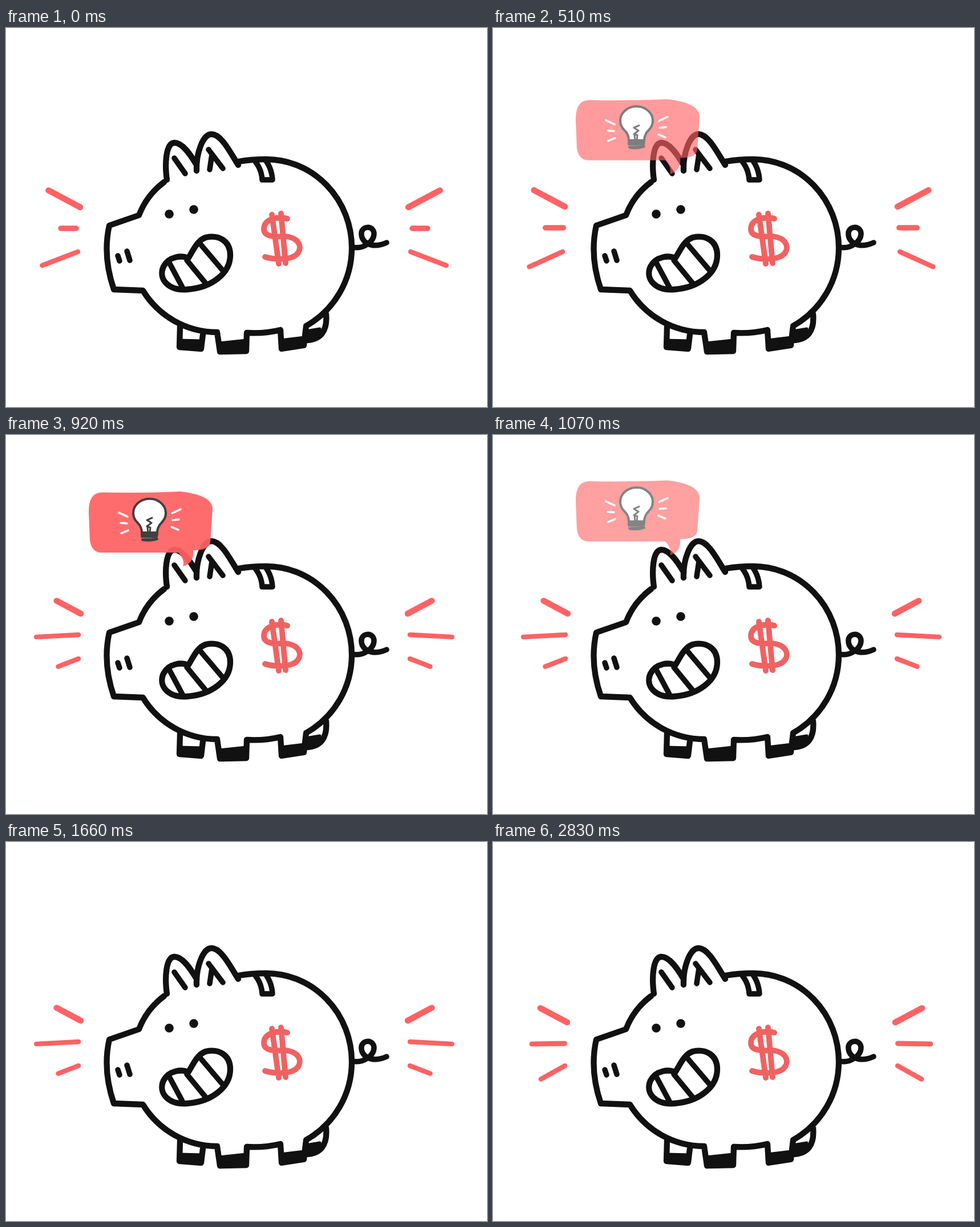
An HTML page for the animation above (2900 ms loop, 843 by 664 pixels).

```html
<!DOCTYPE html>
<html lang="en">
<head>
<meta charset="utf-8">
<title>Piggy bank idea</title>
<style>
  html, body { margin: 0; width: 100%; height: 100%; overflow: hidden; background: #fff; }
  svg { display: block; width: 100%; height: 100%; }
  path { fill: none; stroke-linecap: round; stroke-linejoin: round; }
  #pig { stroke: #111; stroke-width: 10.3; }
  #pig .thin { stroke-width: 9.5; }
  #pig .solid { fill: #111; stroke-width: 5; }
  #dollar { stroke: #f06262; stroke-width: 9.8; }
  #rays { stroke: #ff6264; filter: blur(.7px); }
  #bubble .box { fill: #ff6264; }
  #bubble .ink { stroke: #333; stroke-width: 4; }
  #bubble .glass { fill: #fff; }
  #bubble .cap { fill: #333; }
  #bubble .glow { stroke: #fff; stroke-width: 3.5; }
</style>
</head>
<body>
<svg viewBox="0 0 843 664">
  <g id="pig">
    <!-- ears -->
    <path d="M282 266C278 238 280 202 295 201C310 201 324 223 334 240"/>
    <path d="M334 250C333 220 345 186 360 186C377 186 392 216 407 240"/>
    <path class="thin" d="M295 228L314 255M355 213L380 246M361 221L357 248"/>
    <!-- back, legs, belly and snout -->
    <path d="M407 234Q430 230 456 230A150 155 0 0 1 606 385A157 157 0 0 1 526 522L522 556L483 562L481 529Q452 536 422 534L421 566L375 567L370 533A152 152 0 0 1 240 460L189 458Q169 400 181 346L233 328A130 130 0 0 1 277 270"/>
    <path d="M305 523L304 559L342 562L345 537M561 501Q565 546 525 547"/>
    <path class="solid" d="M304 547L343 548L341 561L304 559ZM374 552L421 547L421 568L375 569ZM481 547L523 542L521 556L483 561ZM526 531L550 527L546 540L525 546Z"/>
    <!-- slot, nostrils, eyes -->
    <path class="thin" d="M437 234Q448 248 449 266L467 266Q466 248 456 233M196 399L199 408M212 391L217 407"/>
    <path d="M286 326h.1M329 318h.1" stroke-width="15.5"/>
    <!-- grin -->
    <path d="M319 404C310 397 285 400 276 418C266 440 285 461 318 458C360 455 393 430 393 398C393 372 372 362 350 367C335 372 328 390 319 404Z"/>
    <path class="thin" d="M286 411L309 454M317 407L349 446M341 379L380 425"/>
    <!-- tail -->
    <path class="thin" d="M608 384C625 388 645 375 645 360C644 346 626 346 623 358C621 375 640 388 667 376"/>
  </g>
  <path id="dollar" d="M493 334C480 330 452 333 452 352C452 366 470 366 490 365C515 368 520 385 510 396C500 407 470 406 454 401M466 327L478 413M482 325L490 412"/>
  <g id="rays"></g>
  <g id="bubble">
    <path class="box" d="M145 150Q144 114 168 113.5Q240 115 305 112Q362 118 362 143L358 200Q357 215 328 215Q330 238 310 243Q314 232 302 219L166 219Q150 218 147 198Z"/>
    <path class="ink glass" d="M238 184Q238 174 231 167A28.5 25 0 1 1 273 166Q265 174 265 184Z"/>
    <path class="ink" d="M256 158L247 162L255 167L247 173L253 175L252 184M248 175L249 184" style="stroke-width:3"/>
    <path class="ink cap" d="M238 186L265 186L264 191L238 191ZM239 196L265 195Q255 199 240 197Z"/>
    <path id="glow" class="glow" d="M198 149L213 156M201 167L212 168M202 185L214 180"/>
    <use href="#glow" transform="matrix(-1 0 0 1 504 -6)"/>
  </g>
</svg>
<script>
  const LOOP = 2900;
  const CYCLE_STARTS = [0, 720, 1460, 2230];

  // As the middle ray stretches, the outer two shrink; shift is a hand-drawn wobble.
  const poses = [
    { stretch: 0,   shiftX: 0,  shiftY: 0 },
    { stretch: 1,   shiftX: 1,  shiftY: -1 },
    { stretch: 0.1, shiftX: -4, shiftY: -1 },
    { stretch: 0.65, shiftX: 0, shiftY: 2 },
  ];

  const rays = document.getElementById('rays');
  const bubble = document.getElementById('bubble');

  // A ray from its inner end outward to the left; positive angles point up.
  function ray(x, y, length, degrees, width) {
    const angle = degrees * Math.PI / 180;
    const dx = -length * Math.cos(angle), dy = -length * Math.sin(angle);
    return `<path stroke-width="${width}" d="M${x} ${y}l${dx} ${dy}"/>`;
  }

  function raysMarkup({ stretch, shiftX, shiftY }) {
    const side = ray(130 + shiftX, 314 + shiftY, 63 - 15 * stretch, 28, 10.5)
      + ray(123 + 4 * stretch, 351 + shiftY, 27 + 47 * stretch, -3 * stretch ** 3, 9.5 - stretch)
      + ray(126 + shiftX, 392, 67 - 29 * stretch, -21 - 36 * stretch * (1 - stretch), 8.5);
    return `${side}<g transform="matrix(-1 0 0 1 835 0)">${side}</g>`;
  }

  function poseAt(t) {
    const start = CYCLE_STARTS.findLast(time => t >= time);
    const hold = start ? 200 : 180;
    return poses[Math.min(3, Math.floor((t - start) / hold))];
  }

  // Progress in 30 ms steps, clamped to 0..1.
  const stepped = (t, start, steps) =>
    Math.min(1, Math.max(0, Math.floor((t - start) / 30) / steps));

  let shownPose;
  function draw(now) {
    const t = now % LOOP;
    const pose = poseAt(t);
    if (pose !== shownPose) rays.innerHTML = raysMarkup(shownPose = pose);

    const rise = stepped(t, 150, 19);
    const leave = stepped(t, 890, 15);
    bubble.setAttribute('opacity', rise * (1 - leave));
    bubble.setAttribute('transform', `translate(0 ${50 - 59 * (rise + leave)})`);
    requestAnimationFrame(draw);
  }
  draw(performance.now());
</script>
</body>
</html>
```
